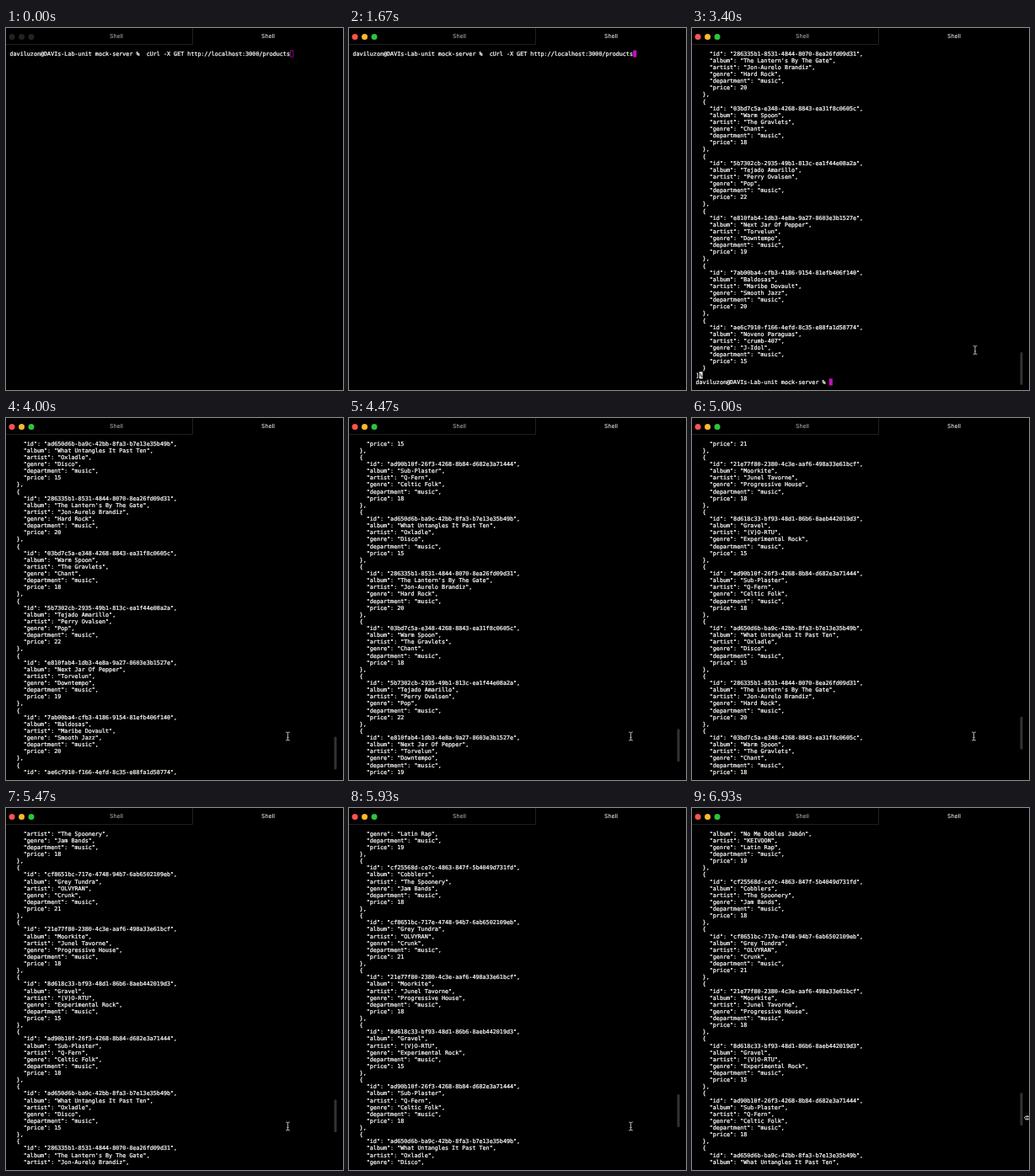
Recreate the animation shown at these times as an HTML page. Size 400 px wide and 430 px high, loop 7000 ms.

```html
<!DOCTYPE html>
<html lang="en">
<head>
<meta charset="utf-8">
<title>Shell</title>
<style>
  html, body { margin: 0; width: 100%; height: 100%; overflow: hidden; background: #000; }
  svg { display: block; width: 100%; height: 100%; }
  text { text-rendering: geometricPrecision; }
  .tab { font: 7px Inter, sans-serif; text-anchor: middle; }
  .mono text { font: 6.74px "DejaVu Sans Mono", monospace; white-space: pre; }
  #rows text { fill: #fff; stroke: #fff; stroke-width: .24px; }
</style>
</head>
<body>
<svg viewBox="0 0 400 430">
  <rect width="400" height="430"/>
  <path d="M0 19.5H221.5V0" fill="none" stroke="#1f1f1f"/>
  <text class="tab" x="131" y="12.4" fill="#b8b8b8">Shell</text>
  <text class="tab" x="311" y="12.4" fill="#fff" font-weight="500">Shell</text>
  <g id="lights">
    <circle cx="7" cy="10.5" r="3.5"/>
    <circle cx="18.5" cy="10.5" r="3.5"/>
    <circle cx="30" cy="10.5" r="3.5"/>
  </g>
  <rect id="caret"/>
  <g id="rows" class="mono"></g>
  <g id="mark" class="mono">
    <rect y="-6.2" width="4.06" height="8.1" fill="#f0f0f0"/>
    <text>%</text>
  </g>
  <rect id="bar" x="389.5" width="3" height="39" rx="1.5" fill="#333"/>
  <path id="beam" d="M-2.4 -5Q-.3 -5 0 -3.8Q.3 -5 2.4 -5M0 -4V4M-2.4 5Q-.3 5 0 3.8Q.3 5 2.4 5M-1.2 1.5H1.2"
        fill="none" stroke="#a8a8a8" stroke-width="1.1"/>
  <path id="resize" d="M-3.2 0L-.8 -2.4V-1H.8V-2.4L3.2 0L.8 2.4V1H-.8V2.4Z"
        fill="#000" stroke="#f4f4f4" stroke-width=".9"/>
</svg>
<script>
const LOOP = 7000, ROWS = 49, PITCH = 8.125, CHAR = 4.0575, LEFT = 4.5, BASE = 32.7;
const FOCUS = 530, ENTER = 1725, OUTPUT = 1795, BAR = 1860, RESIZE = 6925;
const PROMPT = 'daviluzon@DAVIs-Lab-unit mock-server % ';
const COMMAND = PROMPT + ' cUrl -X GET http://localhost:3000/products';

const albums = `
e91c40b7-52da-4f06-9c1e-70d2ab85f364|No Me Dobles Jabón|KEIVOON|Latin Rap|19
cf25568d-ce7c-4863-847f-5b4049d731fd|Cobblers|The Spoonery|Jam Bands|18
cf8651bc-717e-4748-94b7-6ab6502109eb|Grey Tundra|OLVYRAN|Crunk|21
21e77f80-2380-4c3e-aaf6-498a33e61bcf|Moorkite|Junel Tavorne|Progressive House|18
8d618c33-bf93-48d1-86b6-8aeb442019d3|Gravel|(V)O-RTU|Experimental Rock|15
ad90b10f-26f3-4268-8b84-d682e3a71444|Sub-Plaster|Q-Fern|Celtic Folk|18
ad650d6b-ba9c-42bb-8fa3-b7e13e35b49b|What Untangles It Past Ten|Oxladle|Disco|15
286335b1-8531-4844-8070-8ea26fd09d31|The Lantern's By The Gate|Jon-Aurelo Brandiz|Hard Rock|20
03bd7c5a-e348-4268-8843-ea31f8c0605c|Warm Spoon|The Gravlets|Chant|18
5b7302cb-2935-49b1-813c-ea1f44e08a2a|Tejado Amarillo|Perry Ovalsen|Pop|22
e810fab4-1db3-4e8a-9a27-8603e3b1527e|Next Jar Of Pepper|Torvelun|Downtempo|19
7ab00ba4-cfb3-4186-9154-81efb406f140|Baldosas|Maribe Dovault|Smooth Jazz|20
ae6c7910-f166-4efd-8c35-e88fa1d58774|Noveno Paraguas|crumb-407|J-Idol|15`
  .trim().split('\n').map(line => {
    const [id, album, artist, genre, price] = line.split('|');
    return { id, album, artist, genre, department: 'music', price: +price };
  });

// Same layout as the server's JSON, minus the opening bracket scrolled away above.
const output = JSON.stringify(albums, null, 2).split('\n').slice(1).concat(PROMPT);

// Flicks of the scroll wheel: start, end, first line, last line.
const flicks = [
  [3730, 4330, 0, 18], [4400, 5070, 18, 36], [5130, 5730, 36, 52],
  [5863, 5930, 52, 53], [5930, 6270, 53, 55]
];
// Pointer positions: time, x, y.
const path = [
  [270, 389, 389], [600, 372.5, 393.5], [2870, 372.5, 393.5], [3400, 336, 382.5],
  [3530, 335.5, 380], [3600, 334.5, 378], [6800, 334.5, 378], [6930, 397.6, 368]
];

const $ = id => document.getElementById(id);
const clamp = u => Math.min(1, Math.max(0, u));
const smooth = u => u * u * (3 - 2 * u);
const show = (el, on) => el.setAttribute('visibility', on ? 'visible' : 'hidden');
const move = (el, x, y) => el.setAttribute('transform', `translate(${x} ${y})`);
const set = (el, attrs) => { for (const k in attrs) el.setAttribute(k, attrs[k]); };

const rows = Array.from({ length: ROWS }, (_, i) => {
  const row = document.createElementNS('http://www.w3.org/2000/svg', 'text');
  set(row, { x: LEFT, y: BASE + i * PITCH });
  return $('rows').appendChild(row);
});

function scrollAt(t) {
  let pos = 0;
  for (const [start, end, from, to] of flicks)
    if (t >= start) pos = from + (to - from) * smooth(clamp((t - start) / (end - start)));
  return pos;
}

function pointerAt(t) {
  let i = 0;
  while (i < path.length - 2 && t >= path[i + 1][0]) i++;
  const [t0, x0, y0] = path[i], [t1, x1, y1] = path[i + 1];
  const u = clamp((t - t0) / (t1 - t0));
  return [x0 + (x1 - x0) * u, y0 + (y1 - y0) * u];
}

function drawText(lines) {
  rows.forEach((row, i) => {
    const line = lines[i] || '';
    if (row.textContent !== line) row.textContent = line;
  });
}

function drawCaret(col, row, focused) {
  const inset = focused ? 0 : .4;
  set($('caret'), {
    x: LEFT + col * CHAR + inset, y: BASE - 6.2 + row * PITCH + inset,
    width: CHAR - 2 * inset, height: PITCH - 2 * inset,
    fill: focused ? '#c410bd' : 'none', stroke: focused ? 'none' : '#a808a2', 'stroke-width': .8
  });
  show($('caret'), row < ROWS);
}

function draw(t) {
  const focused = t >= FOCUS, printed = t >= OUTPUT;
  const colors = focused ? ['#fc5250', '#fdb92c', '#2ac53f'] : ['#222', '#222', '#222'];
  [...$('lights').children].forEach((c, i) => c.setAttribute('fill', colors[i]));

  const pos = scrollAt(t), line = Math.round(pos);
  if (printed) {
    const top = output.length - ROWS - line;
    drawText(output.slice(top, top + ROWS));
    drawCaret(PROMPT.length, ROWS - 1 + line, true);
  } else {
    drawText([COMMAND]);
    if (t < ENTER) drawCaret(COMMAND.length, 0, focused);
    else drawCaret(0, 1, true);
  }

  const markRow = ROWS - 2 + line;
  show($('mark'), printed && markRow < ROWS);
  move($('mark'), LEFT + CHAR, BASE + markRow * PITCH);

  show($('bar'), t >= BAR);
  $('bar').setAttribute('y', 385 - pos * .85);

  const [x, y] = pointerAt(t);
  const visible = t >= 265 && t < 1660 || t >= 2595;
  show($('beam'), visible && t < RESIZE);
  show($('resize'), t >= RESIZE);
  move($('beam'), x, y);
  move($('resize'), x, y);
}

const start = performance.now();
function tick() {
  draw((performance.now() - start) % LOOP);
  requestAnimationFrame(tick);
}
tick();
</script>
</body>
</html>
```
